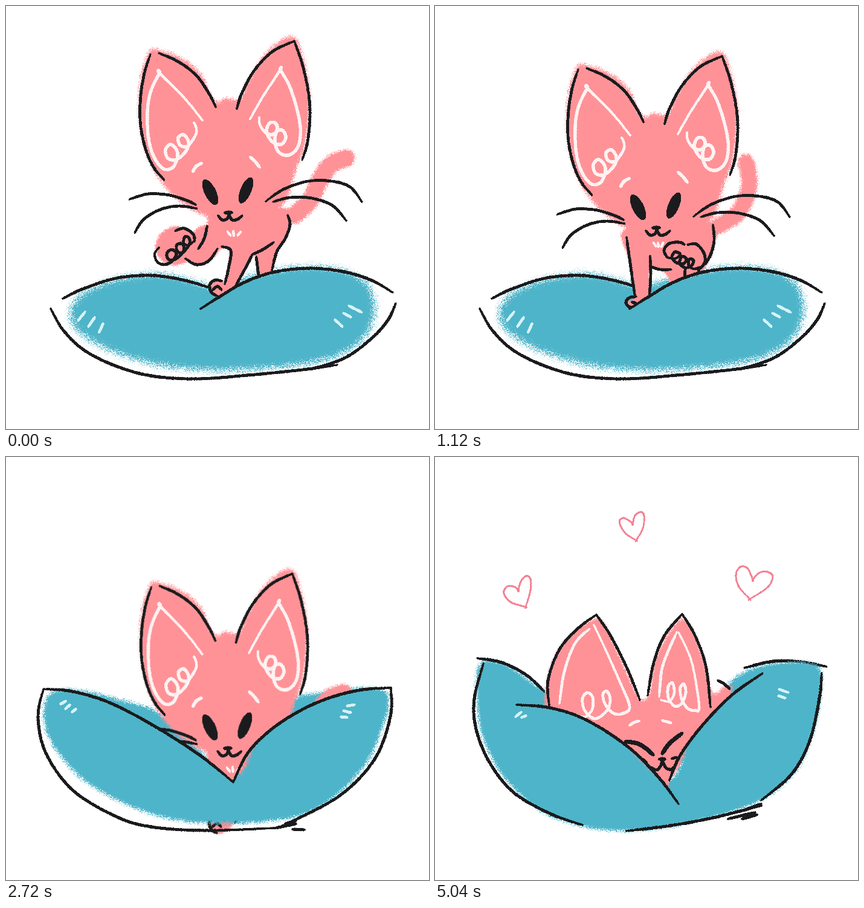
An HTML page with a canvas for the animation above (5.12 s loop, 700x700 px).

```html
<!DOCTYPE html>
<html lang="en">
<head>
<meta charset="utf-8">
<title>Kneading kitten</title>
<style>
html, body { margin: 0; width: 100%; height: 100%; overflow: hidden; background: #fff; }
canvas { display: block; width: 100vw; height: 100vh; }
</style>
</head>
<body>
<canvas id="stage" width="700" height="700"></canvas>
<script>
const SIZE = 700, STEP = 80, FRAMES = 64;
const INK = [27, 27, 29], PINK = [255, 146, 151], TEAL = [78, 180, 201];
const PALE = [255, 242, 242], ICE = [214, 242, 247], ROSE = [243, 132, 150];

// Seeded paper grain shared by every brush
const noise = new Float32Array(SIZE * SIZE);
let seed = 7;
for (let i = 0; i < noise.length; i++) {
  seed = (seed * 1664525 + 1013904223) >>> 0;
  noise[i] = 0.04 + 0.68 * seed / 4294967296;
}

function sheet() {
  const c = document.createElement('canvas');
  c.width = c.height = SIZE;
  return c;
}

function pts(text) {
  const n = text.trim().split(/\s+/).map(Number), out = [];
  for (let i = 0; i < n.length; i += 2) out.push([n[i], n[i + 1]]);
  return out;
}

// Catmull-Rom through the points
function curve(p, closed) {
  const n = p.length, out = [], last = closed ? n : n - 1;
  const at = i => closed ? p[(i + n) % n] : p[Math.max(0, Math.min(n - 1, i))];
  for (let i = 0; i < last; i++) {
    const [a, b, c, d] = [at(i - 1), at(i), at(i + 1), at(i + 2)];
    for (let k = 0; k < 10; k++) {
      const t = k / 10;
      out.push([0, 1].map(j => b[j] + 0.5 * t * (c[j] - a[j] +
        t * (2 * a[j] - 5 * b[j] + 4 * c[j] - d[j] + t * (3 * (b[j] - c[j]) + d[j] - a[j])))));
    }
  }
  if (!closed) out.push(p[n - 1]);
  return out;
}

function trace(g, line) {
  g.beginPath();
  line.forEach(([x, y]) => g.lineTo(x, y));
}

function pen(g, p, w) {
  const line = curve(p), n = line.length - 1;
  g.lineCap = 'round';
  for (let i = 0; i < n; i++) {
    const edge = Math.min(i, n - 1 - i) / n;
    g.lineWidth = w * (0.7 + 0.3 * Math.min(1, edge * 7));
    trace(g, [line[i], line[i + 1]]);
    g.stroke();
  }
}

// Draws once, softens the edge and breaks it up with grain
function brush(color, blur, draw) {
  const raw = sheet(), out = sheet(), g = out.getContext('2d', { willReadFrequently: true });
  draw(raw.getContext('2d'));
  g.filter = `blur(${blur}px)`;
  g.drawImage(raw, 0, 0);
  const img = g.getImageData(0, 0, SIZE, SIZE), d = img.data;
  for (let i = 0; i < noise.length; i++) {
    const a = d[i * 4 + 3];
    if (!a) continue;
    d.set(color, i * 4);
    d[i * 4 + 3] = 255 * Math.max(0, Math.min(1, (a / 255 - noise[i]) * 4));
  }
  g.putImageData(img, 0, 0);
  return out;
}

const strokes = text => text.split('/').map(pts);
const lines = (color, list, w, extra) => brush(color, 0.6, g => {
  list.forEach(p => pen(g, p, w));
  if (extra) extra(g);
});
const blobs = (color, blur, list, extra) => brush(color, blur, g => {
  list.forEach(p => { trace(g, curve(p, true)); g.fill(); });
  if (extra) extra(g);
});

function oval(g, x, y, rx, ry, a) {
  g.beginPath();
  g.ellipse(x, y, rx, ry, a, 0, 7);
  g.fill();
}

function stack(...parts) {
  const out = sheet(), g = out.getContext('2d');
  parts.forEach(c => g.drawImage(c, 0, 0));
  return out;
}

function clipped(src, line) {
  const out = sheet(), g = out.getContext('2d');
  trace(g, line);
  g.clip();
  g.drawImage(src, 0, 0);
  return out;
}

// ---- Cat ----
const head = stack(
  blobs(PINK, 4, strokes(`238 74 223 120 221 185 233 245 262 298 310 338 370 358 430 348 462 325
    480 270 495 230 503 160 494 95 480 54 458 55 425 84 398 130 386 156 365 152 345 158
    322 112 290 86 254 73`)),
  lines(PALE, strokes(`325 189 295 152 254 111 254 111 240 140 234 175 236 220 246 252 262 270
    278 265 284 243 273 229 264 238 268 252 282 254 298 240 302 225 294 213 285 218 288 230 300 232 313 215 315 203 311 193
    / 404 187 425 150 454 106 454 106 468 130 480 165 487 200 485 228 475 243 462 247 450 240
    445 224 448 208 458 206 463 218 455 229 440 224 431 208 436 194 446 194 449 205 440 213 428 208 420 196 419 184
    / 309 274 315 265 324 260 / 404 250 412 257 420 267`), 5.2),
  lines(INK, strokes(`239 80 228 115 222 160 223 200 232 240 245 268 262 288
    / 253 78 285 92 315 115 336 145 347 167
    / 382 170 390 145 410 108 440 76 477 58 / 477 58 490 95 500 140 503 180 499 225 490 255
    / 204 320 235 311 270 313 300 322 314 329 / 213 375 228 353 255 337 285 331 316 335
    / 430 323 460 303 500 290 540 290 570 300 589 324 / 442 324 470 317 505 318 540 330 563 355
    / 351 347 358 354 366 352 369 344 / 369 344 374 354 383 353 391 347`), 4.7, g => {
    oval(g, 338, 308, 9.5, 23, -0.45);
    oval(g, 397, 305, 9, 23, 0.4);
    oval(g, 368, 342, 8, 3.5, 0);
  })
);

const tail = (color, text, w) => brush(color, 3, g => {
  g.lineCap = g.lineJoin = 'round';
  g.lineWidth = w;
  trace(g, curve(pts(text)));
  g.stroke();
});

const bodyA = stack(
  tail(PINK, '478 346 503 322 520 287 538 262 563 252', 29),
  blobs(PINK, 2.5, strokes(`340 335 465 335 470 362 462 388 446 410 441 442 419 448 413 414 405 420
    385 455 364 478 345 480 337 466 346 455 362 452 370 405 350 397
    / 292 396 330 362 355 392 340 420 313 428`), g => oval(g, 281, 397, 34, 32, -0.5)),
  lines(PALE, strokes('366 373 372 380 / 376 372 377 381 / 389 373 383 380'), 4),
  lines(INK, strokes(`466 346 470 362 462 385 448 407 440 438 / 414 415 416 430 418 448
    / 357 398 372 405 368 435 362 460 / 443 391 425 403 408 411 / 408 411 395 436 380 463
    / 358 455 345 454 337 462 340 474 350 480 / 342 470 350 464 357 470
    / 333 364 328 385 318 402 / 297 418 315 428 335 422 350 402
    / 280 372 295 368 310 378 312 390 / 253 400 246 410 250 423 262 428
    275 422 282 410 274 403 266 410 270 420 282 418 294 405 292 394 283 395 283 405 292 408
    303 395 303 384 296 382 294 392 302 396 312 388`), 4.7)
);

const bodyB = stack(
  tail(PINK, '468 362 498 344 515 315 520 285 515 256', 27),
  blobs(PINK, 2.5, strokes(`317 365 460 355 463 390 452 422 436 442 414 450 392 455 378 438 356 434
    355 476 335 497 320 496 317 487 330 478 322 420`)),
  lines(PALE, strokes('361 389 366 396 / 369 390 370 397 / 378 389 374 397'), 4),
  lines(INK, strokes(`317 381 321 410 326 445 331 480 / 356 412 357 440 355 478 / 356 429 372 434 391 434
    / 333 479 321 481 316 489 322 496 333 495 / 326 488 333 490
    / 460 360 462 385 457 407 448 425 / 414 434 412 455 / 437 434 434 446
    / 384 414 379 402 388 391 405 389 413 393 / 418 393 432 392 444 405 447 420 440 431 432 433
    / 384 414 397 416 406 409 397 405 392 414 400 423 412 424 416 416 408 413 405 424
    414 431 424 428 428 419 421 417 420 427 428 433 438 430`), 4.7)
);

// ---- Pillow ----
const shape = (fill, left, right, rimL, rimR, marks) =>
  ({ fill: pts(fill), left: pts(left), right: pts(right), rimL: pts(rimL), rimR: pts(rimR), marks: strokes(marks) });

const mix = (a, b) => Array.isArray(a) ? a.map((v, i) => mix(v, b[i])) : (a + b) / 2;

const plump = shape(
  '112 490 160 459 240 443 300 452 340 463 400 448 470 434 540 434 592 455 609 495 598 540 555 575 475 594 350 602 250 594 165 567 112 530',
  '94 484 130 467 185 450 245 446 300 455 342 468',
  '322 501 352 482 395 457 445 440 505 434 560 440 605 454 640 474',
  '74 501 95 537 130 570 180 595 240 612 315 617 400 611 490 602 548 594',
  '645 492 632 520 605 550 565 580 520 597 490 602',
  '131 506 119 521 / 147 515 136 531 / 161 525 154 540 / 544 519 557 531 / 558 508 571 515 / 567 496 589 507');

const pressed = shape(
  '100 478 125 456 190 447 265 455 330 476 400 450 470 438 540 434 595 445 618 465 612 515 575 565 480 594 350 605 240 592 160 565 112 530',
  '75 474 110 455 180 446 250 452 300 467 326 482',
  '320 507 350 482 390 458 450 440 520 434 590 441 632 458',
  '75 484 90 520 125 560 200 598 310 616 420 608 500 602 545 596',
  '632 458 629 490 615 528 588 562 545 596',
  '134 486 119 500 / 142 493 130 504 / 148 507 139 514 / 553 505 568 513 / 562 489 577 495 / 569 476 590 480');

const folded = shape(
  '68 398 110 385 190 402 265 432 376 528 420 450 480 402 540 388 590 382 630 390 628 430 590 515 500 588 360 606 240 590 130 535 70 460',
  '64 384 110 388 170 406 240 442 320 493 376 538',
  '376 538 400 490 440 450 490 418 540 397 590 385 637 382',
  '62 384 53 430 66 490 110 551 180 594 240 612 330 618 445 614',
  '637 382 636 430 610 500 550 562 450 614',
  '99 404 90 409 / 106 410 98 417 / 116 417 109 422 / 554 430 565 431 / 558 420 571 423 / 564 412 577 410');

const sinking = {};
for (const k in folded) sinking[k] = mix(pressed[k], folded[k]);

const floor = [[SIZE, SIZE], [0, SIZE]];

// "deep" pillows hide the cat behind both lobes
function pillow(s, blur, deep, scratches) {
  const fill = blobs(TEAL, blur, [s.fill]);
  const right = curve(s.right), left = curve(s.left);
  const edge = deep
    ? [[0, s.left[0][1]], ...left, ...right, [SIZE, right[right.length - 1][1]], ...floor]
    : [...right, [SIZE, SIZE], [s.right[0][0], SIZE]];
  const rims = [s.rimL, s.rimR, ...scratches];
  return {
    back: deep ? fill : stack(fill, lines(INK, [s.left], 5)),
    front: stack(clipped(fill, edge),
      lines(INK, [s.right, ...rims, ...(deep ? [s.left] : [])], 5),
      lines(ICE, s.marks, 4.6))
  };
}

const overspill = blobs(TEAL, 4, strokes('120 392 185 402 250 422 275 470 200 440 / 465 420 480 398 520 390 575 386 540 425 480 450'));
const pillows = [
  pillow(plump, 9, false, []),
  pillow(pressed, 6, false, []),
  pillow(sinking, 5, true, []),
  pillow(folded, 5, true, strokes('445 614 480 607 / 462 607 480 602 / 474 616 494 617'))
];
pillows[3].back = stack(pillows[3].back, overspill);

// ---- Snuggled scene ----
function snuggle() {
  const fill = blobs(TEAL, 4, strokes(`74 342 115 342 165 376 215 405 290 450 386 535 425 455 475 385 520 352
    580 340 633 346 638 390 625 455 596 520 535 570 430 603 330 618 250 612 175 585 115 530 80 465 70 400`));
  const fold = pts('135 410 190 415 250 435 320 480 370 530 403 574');
  const lap = pts('388 535 405 495 440 447 490 395 542 358');
  const edge = [[0, 330], [80, 380], ...curve(fold.slice(0, 5)), [386, 548], ...curve(lap), [610, 325], [SIZE, 330], ...floor];
  return stack(
    fill,
    lines(INK, strokes('70 333 110 340 150 360 181 388 / 512 349 560 338 605 339 648 347'), 5),
    blobs(PINK, 3.5, strokes(`186 425 188 360 215 305 262 268 282 280 312 345 338 398 354 394 366 330
      405 268 428 290 447 345 460 392 480 378 492 385 470 430 400 520 375 560 330 520 240 450`)),
    lines(PALE, strokes(`206 408 214 355 232 308 256 284 / 263 278 285 325 305 370 322 412 312 424 295 424
      281 408 278 392 285 388 290 402 284 420 265 433 248 420 244 400 252 390 261 398 260 418 248 430 235 427
      / 371 397 377 345 400 290 / 403 290 425 340 437 412 430 419 418 416 408 400 406 382 412 376 415 390
      408 408 396 412 386 398 386 380 393 374 396 390 388 404 374 402
      / 322 444 330 439 338 437 / 376 436 391 440`), 4.6),
    lines(INK, strokes(`189 412 187 370 205 320 235 285 267 261 / 267 261 290 295 318 350 339 402
      / 352 395 362 340 380 295 409 260 / 409 260 430 295 448 345 456 414 / 468 370 478 375 488 384
      / 357 513 366 518 373 512 376 502 / 376 502 382 514 390 517 397 512 / 392 499 400 497 / 344 500 350 506`), 4.7, g => {
      oval(g, 376, 500, 7, 3.5, 0);
      strokes('315 471 335 474 350 483 361 493 / 376 491 388 474 409 457').forEach(p => pen(g, p, 7));
    }),
    clipped(fill, edge),
    lines(INK, [fold, lap, ...strokes(`80 342 65 400 68 450 90 505 130 555 190 590 244 609
      / 640 358 636 400 620 470 590 525 540 568 / 316 619 390 610 460 597 540 577
      / 485 599 530 588 / 508 599 533 592 / 510 585 540 574`)], 5),
    lines(ICE, strokes('133 430 143 422 / 143 431 151 428 / 569 384 585 390 / 568 395 580 399'), 4.4)
  );
}
const cosy = snuggle();

const hearts = [
  [137, 223, '150 248 150 248 125 240 114 225 120 214 132 215 138 221 138 221 142 206 151 197 158 202 158 221 150 248 150 248'],
  [326, 115, '333 138 333 138 315 126 305 108 312 101 325 108 327 111 327 111 331 97 341 91 346 98 344 118 333 138 333 138'],
  [528, 208, '521 235 521 235 503 215 498 195 505 182 517 184 526 203 526 203 536 192 550 190 559 198 550 216 521 235 521 235']
].map(([x, y, p]) => ({ x, y, art: lines(ROSE, [pts(p)], 2.8) }));

// ---- Playback ----
const ctx = document.getElementById('stage').getContext('2d');
const level = [0, 2, 30, 88, 146];
const bed = [0, 0, 1, 2, 3];
const lift = [0, -7, -11], drop = [12, 19, 23];

function drawCat(pair, pressing, step) {
  const y = level[pair] + (pressing ? drop : lift)[step];
  const s = pressing ? 0 : step / 2;
  ctx.save();
  ctx.translate(362 - (pressing ? 2 : s), 58 + y);
  ctx.scale(1 - 0.02 * s, 1 + 0.0175 * s);
  ctx.translate(-362, -58);
  if (pressing) ctx.drawImage(bodyB, 2, -23);
  else ctx.drawImage(bodyA, 0, 0);
  ctx.drawImage(head, 0, 0);
  ctx.restore();
}

function drawHearts(frame) {
  const beat = frame % 3;
  hearts.forEach((h, i) => {
    ctx.save();
    ctx.translate(h.x, h.y);
    ctx.rotate([0, 0.06, -0.06][beat] * (i % 2 ? -1 : 1));
    ctx.scale(beat ? 0.98 : 1, beat ? 0.98 : 1);
    ctx.drawImage(h.art, -h.x, -h.y);
    ctx.restore();
  });
}

function draw(frame) {
  ctx.fillStyle = '#fff';
  ctx.fillRect(0, 0, SIZE, SIZE);
  if (frame >= 40) {
    ctx.drawImage(cosy, 0, 0);
    drawHearts(frame);
    return;
  }
  const cycle = frame >> 2, pair = cycle >> 1, p = pillows[bed[pair]];
  ctx.drawImage(p.back, 0, 0);
  drawCat(pair, cycle & 1, Math.min(frame & 3, 2));
  ctx.drawImage(p.front, 0, 0);
}

let shown = 0;
const start = performance.now();
draw(0);
(function tick() {
  const frame = Math.floor(Math.max(0, performance.now() - start) / STEP) % FRAMES;
  if (frame !== shown) draw(shown = frame);
  requestAnimationFrame(tick);
})();
</script>
</body>
</html>
```
